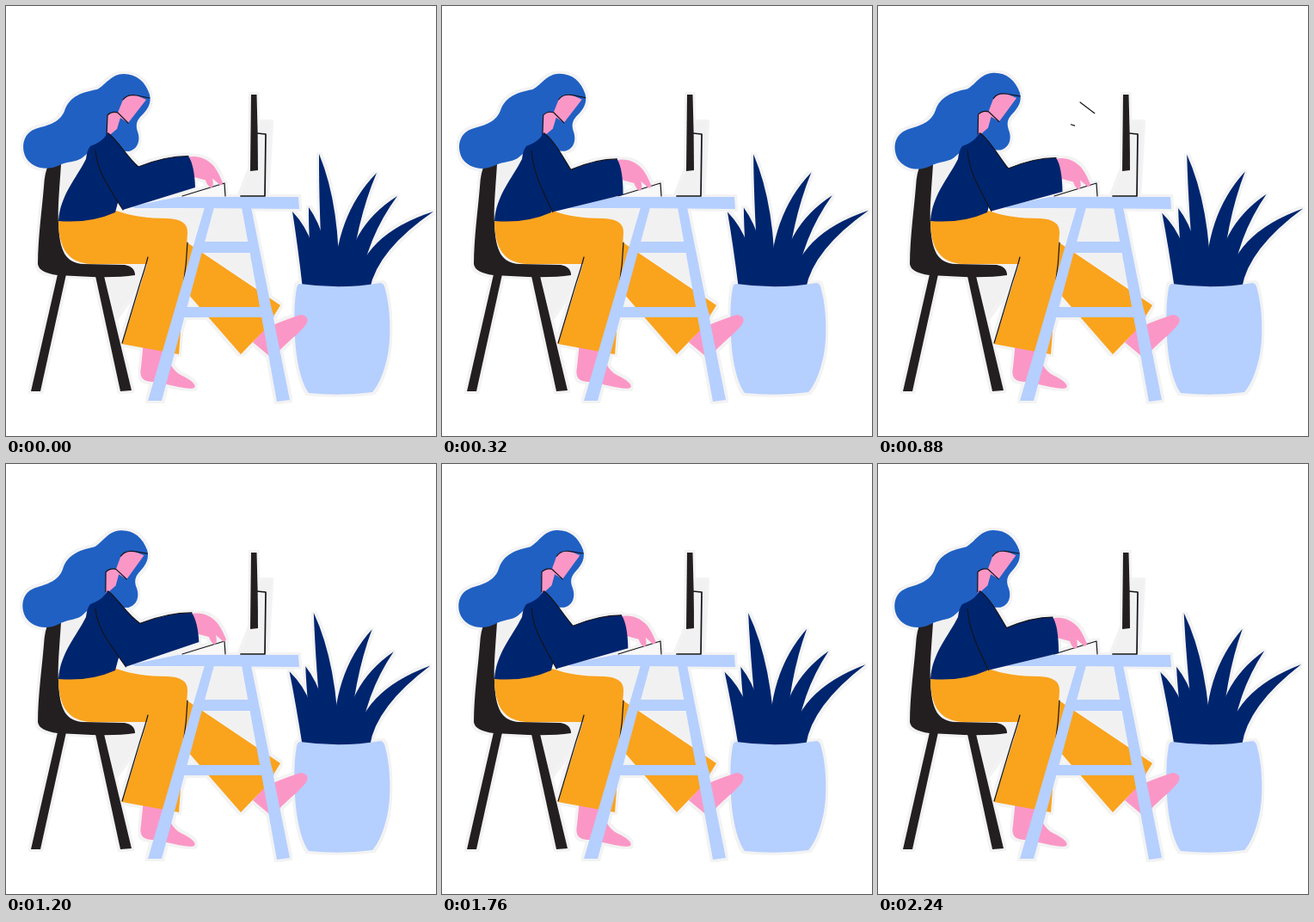
These frames come from a looping animation (500x500 px, 2320 ms). An HTML page:

```html
<!DOCTYPE html>
<html lang="en">
<head>
<meta charset="utf-8">
<title>Working at a desk</title>
<style>
  html, body { margin: 0; width: 100%; height: 100%; overflow: hidden; background: #fff; }
  svg { display: block; width: 100vw; height: 100vh; }
  .ink { fill: #231f20; }
  .navy { fill: #00256f; }
  .hair { fill: #2060c3; }
  .skin { fill: #fb97c6; }
  .gold { fill: #faa31d; }
  .sky { fill: #b5cfff; }
  .pale { fill: #f1f1f1; }
  .line { fill: none; stroke: #14141c; stroke-width: 1.2; stroke-linecap: round; stroke-linejoin: round; }
  .bold { stroke-width: 1.7; }
</style>
</head>
<body>
<svg viewBox="0 0 500 500">
  <defs>
    <filter id="edge" x="0" y="0" width="500" height="500" filterUnits="userSpaceOnUse" color-interpolation-filters="sRGB">
      <feMorphology in="SourceAlpha" operator="dilate" radius="3" result="wide"/>
      <feFlood flood-color="#f3f3f3"/>
      <feComposite in2="wide" operator="in" result="rim"/>
      <feMerge><feMergeNode in="rim"/><feMergeNode in="SourceGraphic"/></feMerge>
    </filter>
  </defs>

  <g filter="url(#edge)">
    <g class="pale">
      <path d="M63 185L96 170L92 186L62 235Z"/>
      <path d="M130 240L231 234L219 275L211 270L200 248Z"/>
      <path d="M240 234H276L283 275H228Z"/>
      <path d="M225 288H286L300 333L232 287Z"/>
      <path d="M114 312L164 300L157 322L127 362Z"/>
      <path d="M293 135H308L303 222H272L284 192H293Z"/>
    </g>

    <g class="ink">
      <path d="M50 184Q56 182 64 184C62 215 60 235 61 252C62 286 70 299 90 300L138 301Q150 303 150 313Q130 316 100 315L60 313Q38 310 37 300C37 270 42 235 44 210Q45 192 50 184Z"/>
      <path d="M60 312H70L40 448H29Z"/>
      <path d="M104 314H114L146 447L133 448Z"/>
    </g>

    <g id="head">
      <path class="hair" d="M137 79C122 79 116 92 106 97C90 100 74 104 68 122C62 137 46 139 34 143C20 148 17 164 23 176C30 188 46 192 60 186C72 180 80 182 88 177C94 172 98 168 104 168L143 169C155 166 156 154 153 146C150 137 153 132 158 127C166 119 169 112 167 103C162 88 152 79 137 79Z"/>
      <path class="skin" d="M118 127Q123 122 130 124L136 109Q141 102 152 104L163 109L142 136L133 130L129 143L117 153Z"/>
      <path class="line" d="M117 150L118 127Q123 122 130 124L142 136M136 109Q141 102 152 104L167 107"/>
    </g>

    <g id="leaves" class="navy"></g>
    <path class="sky" d="M342 323Q390 330 436 322Q440 323 441 330C447 350 448 385 444 405C439 430 432 442 426 449Q390 454 352 450C343 438 337 410 336 385C335 360 335 345 338 328Q339 323 342 323Z"/>

    <g class="skin">
      <path d="M160 390H188C186 412 193 424 205 430C215 435 222 440 219 444C212 447 190 440 172 437C158 437 155 431 157 420Z"/>
      <path d="M287 391L302 374C316 369 332 362 343 359Q354 361 349 370C338 385 318 396 311 411Z"/>
    </g>
    <path class="gold" d="M209 274L319 348L303 374L273 405L204 326Z"/>
    <path class="gold" d="M61 249Q96 252 128 238C145 244 164 247 188 247Q212 248 211 264L208 312L201 405L135 393L164 300H100C72 299 61 282 61 249Z"/>
    <path class="line" d="M165 292Q162 304 156 322L135 392M211 275Q210 300 206 326"/>
    <path class="navy" d="M118 147C114 156 106 160 98 163Q94 168 93 178C82 200 63 220 61 250Q98 253 127 240L140 192L122 151Z"/>

    <g class="sky">
      <path d="M146 233L200 222H340L341 236L230 235L150 235Z"/>
      <path d="M231 234H242L181 459H165Z"/>
      <path d="M274 234H285L330 458L315 460Z"/>
      <path d="M226 274H290L293 287H223Z"/>
      <path d="M203 350H308L312 362H200Z"/>
    </g>

    <path class="pale" d="M292 148L302 149L301 221H273L284 192H292Z"/>
    <path class="line bold" d="M292 148L302 149L301 221H273"/>
    <path class="ink" d="M285 103H291.5Q293 147 293 191L284 192Z"/>
    <path fill="#f8f8f8" d="M205 221L254 206L255 221Z"/>
    <path class="line" d="M205 221L254 206L255 221"/>

    <path id="hand" class="skin" d="M210 178C221 174 233 179 240 186C245 191 249 200 252 207Q250 212 247 208L240 202Q242 210 239 213Q234 211 232 204L217 200Z"/>
    <path id="arm" class="navy"/>
    <path id="seam" class="line"/>
  </g>
  <g id="sparks" class="line"></g>
</svg>

<script>
const LOOP = 2320, STEP = 80, END = 2240;
const POT = { x: 384, y: 326 };
const leafTips = [[333, 239], [352, 234], [364, 172], [431, 194], [455, 221], [497, 239]];
// Turning points of the typing hand: time, offset
const handKeys = [[0, 0], [560, -14], [1200, 4], [END, -9]];

const byId = id => document.getElementById(id);
const mix = (a, b, u) => a + (b - a) * u;
const ease = u => (1 - Math.cos(Math.PI * Math.min(u, 1))) / 2;
const turn = (id, deg, x, y) => byId(id).setAttribute("transform", `rotate(${deg} ${x} ${y})`);

function addPath(id) {
  const path = document.createElementNS("http://www.w3.org/2000/svg", "path");
  return byId(id).appendChild(path);
}

function setPath(el, d) {
  el.setAttribute("d", d);
}

// Each leaf rises steeply from the pot, then bends out to its tip
function growLeaf([x, y], i) {
  const baseX = 354 + 12 * i, baseY = POT.y + 3;
  const dx = x - baseX, dy = y - baseY, length = Math.hypot(dx, dy);
  const bendX = baseX + dx * .1, bendY = y - dy * .4;
  const nx = -dy / length * 13, ny = dx / length * 13;
  setPath(addPath("leaves"), `M${baseX - 9} ${baseY}Q${bendX - nx} ${bendY - ny} ${x} ${y}`
    + `Q${bendX + nx} ${bendY + ny} ${baseX + 9} ${baseY}Z`);
}

function handOffset(t) {
  const next = Math.max(1, handKeys.findIndex(([time]) => time >= t));
  const [t0, a] = handKeys[next - 1], [t1, b] = handKeys[next];
  return mix(a, b, ease((t - t0) / (t1 - t0)));
}

function drawArm(t) {
  const a = handOffset(t), lift = -.4 * a - 1.5;
  const cuffX = 212 + a, cuffY = 176 + lift;
  const hemX = 220 + a * 1.1, hemY = Math.min(211 - a, 223);
  const inner = `${154 + a * .5} ${187 - a * .4}`;
  const elbow = `${136 + a * .85} ${237 - a * .3}`;
  const top = `C130 156 141 176 ${inner}Q${185 + a * .7} ${cuffY} ${cuffX} ${cuffY}`;
  const back = `C${115 + a * .4} 204 106 190 104 168`;
  setPath(byId("arm"), `M119 148${top}Q${cuffX + 7} ${cuffY + 10} ${hemX} ${hemY}L${elbow}${back}Z`);
  setPath(byId("seam"), `M119 148${top}M${elbow}${back}`);
  byId("hand").setAttribute("transform", `translate(${a} ${lift})`);
}

// Dashes fan out from the screen, the lowest one first
function drawSpark(path, i, t) {
  const u = (t - 640 + 160 * i) / 440;
  const point = k => `${mix(272, 222, k)} ${mix(140 + 13 * i, 102 + 35 * i, k)}`;
  setPath(path, u > 0 && u < 1 ? `M${point(u ** 1.5)}L${point(u ** .5)}` : "");
}

leafTips.forEach(growLeaf);
const sparks = [0, 1, 2].map(() => addPath("sparks"));

function frame() {
  const t = Math.floor(performance.now() % LOOP / STEP) * STEP;
  turn("head", -2 * ease(t / 1400), 80, 185);
  turn("leaves", -3.1 * Math.sin(Math.PI / 2 * t / END), POT.x, POT.y);
  drawArm(t);
  sparks.forEach((path, i) => drawSpark(path, i, t));
  requestAnimationFrame(frame);
}
frame();
</script>
</body>
</html>
```
